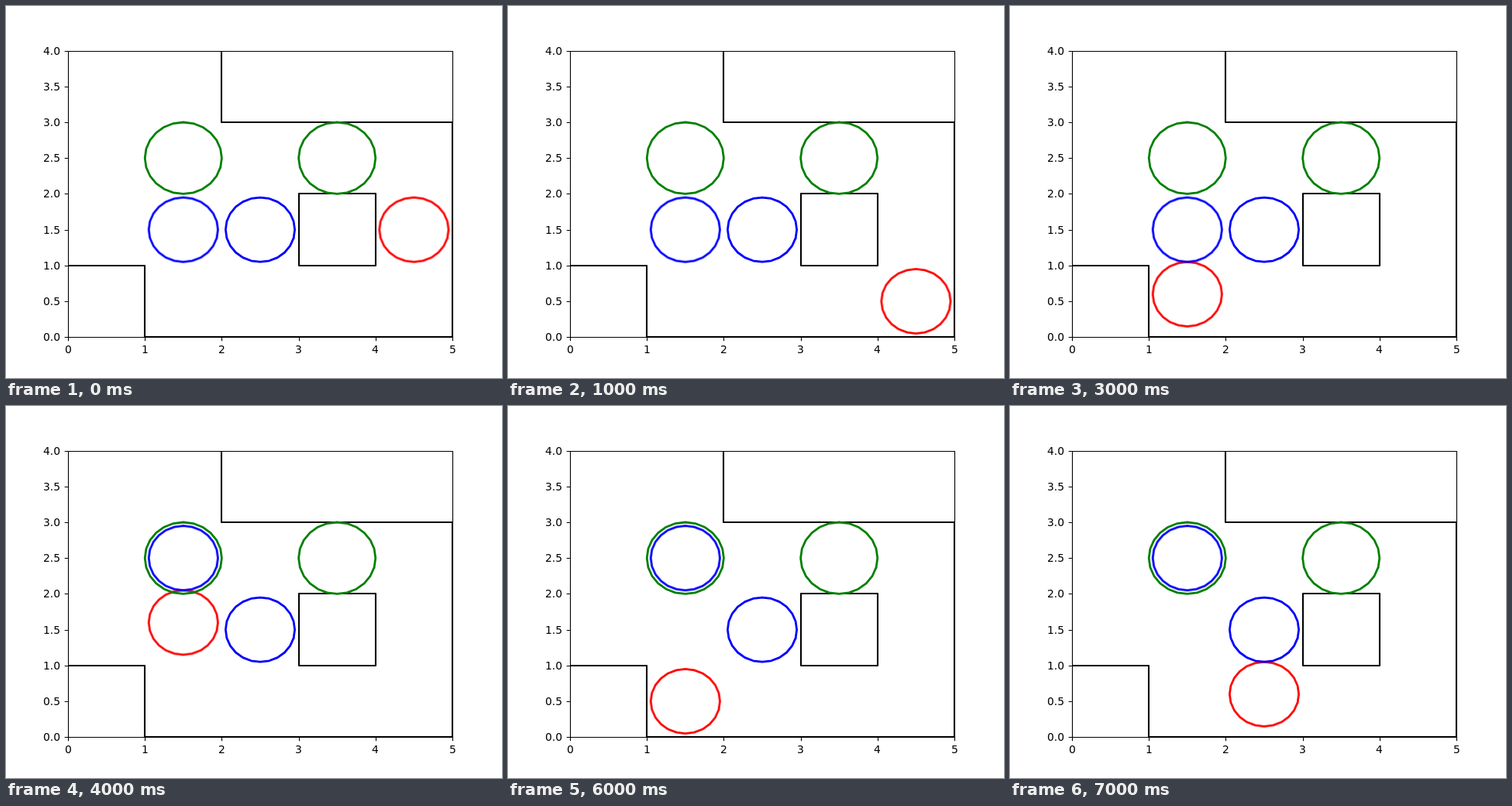
An HTML page for the animation above (8000 ms loop, 640 by 480 pixels).

```html
<!DOCTYPE html>
<html lang="en">
<head>
<meta charset="utf-8">
<title>Grid puzzle plot</title>
<style>
  html, body { margin: 0; width: 100%; height: 100%; overflow: hidden; background: #fff; }
  svg { display: block; width: 640px; height: 480px; }
  path { fill: none; }
  .wall { stroke: #000; stroke-width: 2.083; stroke-linejoin: round; }
  .axis { stroke: #000; stroke-width: 1.111; }
  .disc { stroke-width: 2.778; stroke-linejoin: round; stroke-linecap: square; }
  text { font: 13.889px "DejaVu Sans", sans-serif; fill: #000; }
</style>
</head>
<body>
<svg id="plot" viewBox="0 0 640 480">
  <clipPath id="area"><rect x="80" y="58" width="497" height="370"/></clipPath>
  <g id="data" clip-path="url(#area)"></g>
  <g id="axes"></g>
</svg>
<script>
const LOOP = 8000;
const UNIT_X = 99.2, UNIT_Y = 92.4;
const px = x => 80 + x * UNIT_X;
const py = y => 427.2 - y * UNIT_Y;
const data = document.getElementById('data');
const axes = document.getElementById('axes');

function add(parent, tag, attrs, text = '') {
  const el = document.createElementNS('http://www.w3.org/2000/svg', tag);
  for (const key in attrs) el.setAttribute(key, attrs[key]);
  el.textContent = text;
  parent.append(el);
  return el;
}

function wall(points, end = '') {
  const d = points.map(([x, y]) => Math.round(px(x)) + ',' + Math.round(py(y))).join('L');
  add(data, 'path', { class: 'wall', d: 'M' + d + end });
}

// A 24-sided ring whose open ends meet one step below the right-hand point.
function disc(color, r, spots) {
  const points = [];
  for (let i = -1; i <= 23; i++) {
    const a = i * Math.PI / 12;
    points.push((r * UNIT_X * Math.cos(a)).toFixed(2) + ',' + (-r * UNIT_Y * Math.sin(a)).toFixed(2));
  }
  const el = add(data, 'path', { class: 'disc', stroke: color, d: 'M' + points.join('L') });
  const place = ([x, y]) => `translate(${px(x).toFixed(2)}px, ${py(y).toFixed(2)}px)`;
  el.style.transform = place(spots[0]);
  if (spots.length < 2) return;
  const frames = spots.map((spot, i) => ({
    transform: place(spot), offset: i / spots.length, easing: 'steps(1, end)'
  }));
  frames.push({ transform: place(spots[spots.length - 1]), offset: 1 });
  el.animate(frames, { duration: LOOP, iterations: Infinity });
}

wall([[0, 1], [1, 1], [1, 0], [5, 0], [5, 3], [2, 3], [2, 4]]);
wall([[3, 1], [4, 1], [4, 2], [3, 2]], 'Z');

// One spot per second.
disc('#f00', 0.45, [
  [4.5, 1.5], [4.5, 0.5], [3.5, 0.5], [1.5, 0.6],
  [1.5, 1.6], [1.5, 1.5], [1.5, 0.5], [2.5, 0.6]
]);
disc('#00f', 0.45, [[1.5, 1.5], [1.5, 2.5]]);
disc('#00f', 0.45, [[2.5, 1.5]]);
disc('#008000', 0.5, [[1.5, 2.5]]);
disc('#008000', 0.5, [[3.5, 2.5]]);

const snap = v => Math.round(v) + 0.5;
let lines = 'M80.5,58.5H576.5V427.5H80.5Z';
for (let x = 0; x <= 5; x++) {
  lines += `M${snap(px(x))},427.5v4.86`;
  add(axes, 'text', { x: Math.round(px(x) - 4.42), y: 448 }, x);
}
for (let y = 0; y <= 4; y += 0.5) {
  lines += `M80.5,${snap(py(y))}h-4.86`;
  add(axes, 'text', { x: 48, y: Math.round(py(y) + 5) }, y.toFixed(1));
}
add(axes, 'path', { class: 'axis', d: lines });
</script>
</body>
</html>
```
